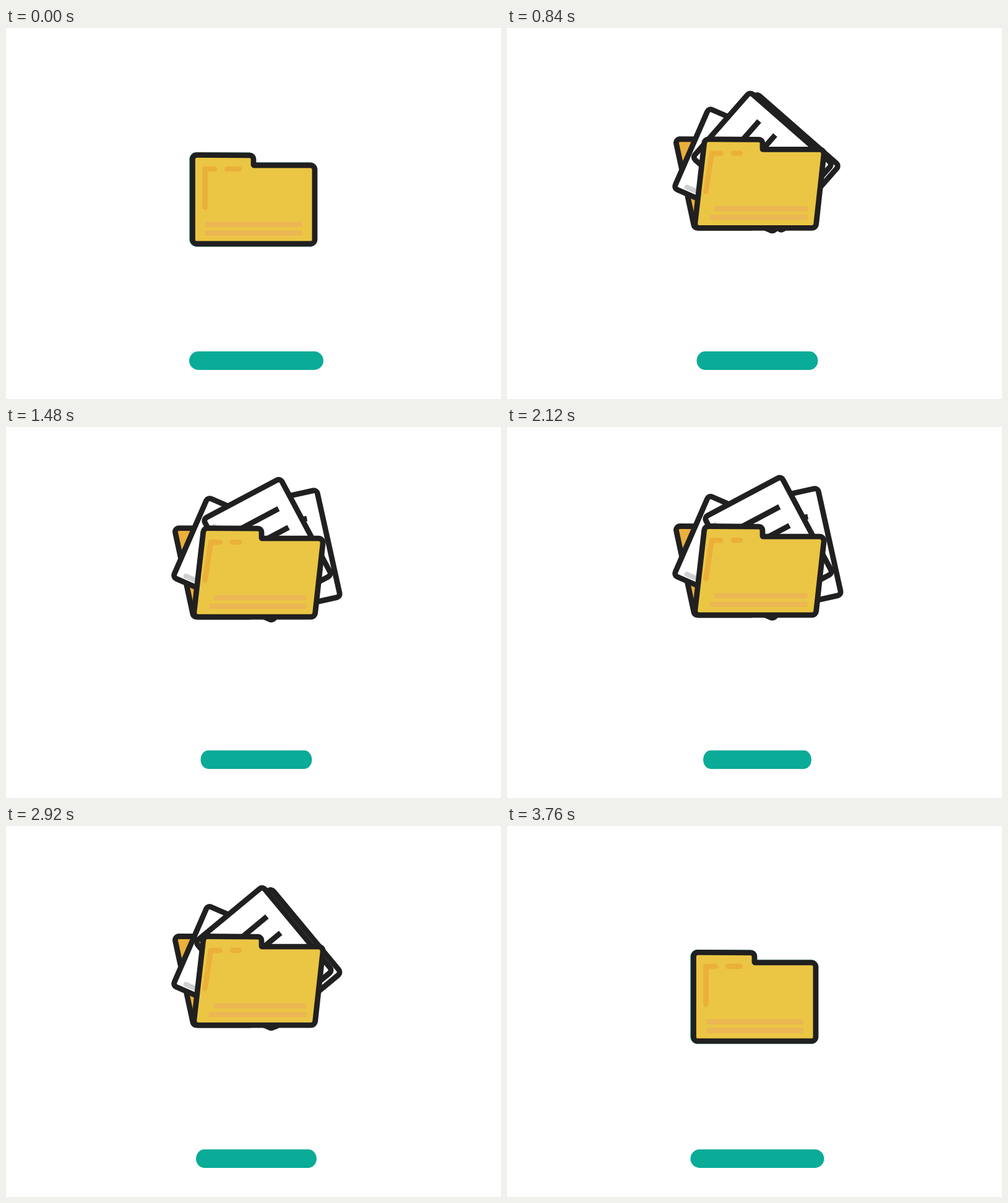
These frames come from a looping animation (800x600 px, 3.8 s). An HTML page with a canvas:

```html
<!DOCTYPE html>
<html lang="en">
<head>
<meta charset="utf-8">
<title>Floating folder</title>
<style>
html, body { margin: 0; width: 100%; height: 100%; overflow: hidden; background: #fff; }
canvas { display: block; width: 800px; height: 600px; }
</style>
</head>
<body>
<canvas id="stage" width="800" height="600"></canvas>
<script>
const ctx = document.getElementById('stage').getContext('2d');
const LOOP = 3800, STEP = 40, PEAK = 1880, LIFT = 46.5;
const INK = '#212020', TEAL = '#0aab97', YELLOW = '#ebc644', ORANGE = '#ebb03a', BAND = '#ebb653';
const PAGE_W = 141, PAGE_H = 177, STACKED = -90;

// Resting centre and angle of each page, and the point it swings around.
const pages = [
  { x: 452.4, y: 245, angle: -12.5, px: 431, py: 288 },
  { x: 379, y: 255.4, angle: -66.5, px: 425, py: 274 },
  { x: 422.5, y: 236, angle: -28, px: 427, py: 264.5 }
];

const clamp = v => Math.min(1, Math.max(0, v));
const ramp = (t, from, to) => clamp((t - from) / (to - from));
const mix = (a, b, k) => a + (b - a) * k;
const rad = deg => deg * Math.PI / 180;

// Near-linear start, soft landing; x2 places the second control point.
function settle(p, x2) {
  const curve = (s, a, b) => 3 * s * (1 - s) ** 2 * a + 3 * s * s * (1 - s) * b + s ** 3;
  let lo = 0, hi = 1;
  for (let i = 0; i < 24; i++) {
    const mid = (lo + hi) / 2;
    if (curve(mid, 1 / 6, x2) < p) lo = mid; else hi = mid;
  }
  return curve(lo, 1 / 6, 1);
}

function roundedPath(points, radius) {
  const n = points.length;
  const [a, b] = [points[n - 1], points[0]];
  ctx.beginPath();
  ctx.moveTo((a[0] + b[0]) / 2, (a[1] + b[1]) / 2);
  points.forEach((p, i) => {
    const next = points[(i + 1) % n];
    ctx.arcTo(p[0], p[1], next[0], next[1], Array.isArray(radius) ? radius[i] : radius);
  });
  ctx.closePath();
}

function outlined(fill) {
  ctx.fillStyle = fill;
  ctx.fill();
  ctx.strokeStyle = INK;
  ctx.lineWidth = 8.8;
  ctx.stroke();
}

function line(points, color, width, cap) {
  ctx.beginPath();
  points.forEach(p => ctx.lineTo(p[0], p[1]));
  ctx.strokeStyle = color;
  ctx.lineWidth = width;
  ctx.lineCap = cap;
  ctx.lineJoin = 'round';
  ctx.stroke();
}

function drawPage(page, sweep) {
  const angle = Math.min(page.angle, sweep);
  const turn = rad(angle - page.angle), full = rad(STACKED - page.angle);
  const swing = a => {
    const dx = page.x - page.px, dy = page.y - page.py;
    return [page.px + dx * Math.cos(a) - dy * Math.sin(a),
            page.py + dx * Math.sin(a) + dy * Math.cos(a)];
  };
  const [x, y] = swing(turn), [ex, ey] = swing(full);
  const tuck = (turn / full) ** 3;
  const w = PAGE_W / 2, h = PAGE_H / 2;

  ctx.save();
  ctx.translate(x + (404 - ex) * tuck, y + (280 - ey) * tuck);
  ctx.rotate(rad(angle));
  roundedPath([[-w, -h], [w, -h], [w, h], [-w, h]], 6);
  outlined('#fff');
  line([[-60.5, -70], [-60.5, -20]], '#cfcfcf', 8, 'round');
  for (const row of [-46.5, -12, 22.5]) line([[-45, row], [45, row]], INK, 8.8, 'butt');
  ctx.restore();
}

function drawBack(open) {
  roundedPath([[mix(301.5, 272, open), 205.3], [390, 205.7], [400, 349], [mix(301.5, 303, open), 349]], 6);
  outlined(ORANGE);
}

function drawFront(open) {
  const at = (closed, opened) => mix(closed, opened, open);
  const shape = [
    [at(301.5, 319.5), 205.3], [at(400, 413), 206], [at(400, 413), 222],
    [at(499, 513), 222], [499, 349], [at(301.5, 303), 349]
  ];
  const radii = [7, 6, 1, 7, 7, 7];
  if (open === 0) {
    roundedPath(shape.map(([x, y]) => [x - 0.8, y]), radii);
    ctx.strokeStyle = TEAL;
    ctx.lineWidth = 8.8;
    ctx.stroke();
  }
  roundedPath(shape, radii);
  outlined(YELLOW);

  const corner = at(321.5, 331);
  line([[321.5, 289.7], [corner, 228], [at(337, 345.5), 228]], ORANGE, 8.6, 'round');
  line([[at(357.3, 366), 228], [377, 228]], ORANGE, 8.6, 'round');
  ctx.fillStyle = BAND;
  const end = at(479, 485.5);
  [[at(322, 335.5), 313.5], [at(322, 328), 327.5]].forEach(([x, y]) => ctx.fillRect(x, y, end - x, 8.5));
}

function drawBar(t) {
  const shrink = 1 - 0.22 * (1 - Math.abs(t / (LOOP / 2) - 1));
  ctx.save();
  ctx.translate(404.5, 538);
  ctx.scale(shrink, 1);
  ctx.beginPath();
  ctx.roundRect(-108.5, -15, 217, 30, 15);
  ctx.fillStyle = TEAL;
  ctx.fill();
  ctx.restore();
}

function draw(t) {
  ctx.fillStyle = '#fff';
  ctx.fillRect(0, 0, 800, 600);
  drawBar(t);

  const rise = t < PEAK ? settle(t / PEAK, 0.72) : settle((LOOP - t) / (LOOP - PEAK), 0.69);
  const open = ramp(t, 560, 680) - ramp(t, 3120, 3240);
  const fan = ramp(t, 658, 1000) - ramp(t, 2800, 3142);
  const sweep = mix(STACKED, -12.5, fan);

  ctx.save();
  ctx.translate(0, -LIFT * rise);
  if (open > 0) drawBack(open);
  if (fan > 0) pages.forEach(page => drawPage(page, sweep));
  drawFront(open);
  ctx.restore();
}

const start = performance.now();
function tick() {
  const t = (performance.now() - start) % LOOP;
  draw(Math.floor(t / STEP) * STEP);
  requestAnimationFrame(tick);
}
tick();
</script>
</body>
</html>
```
